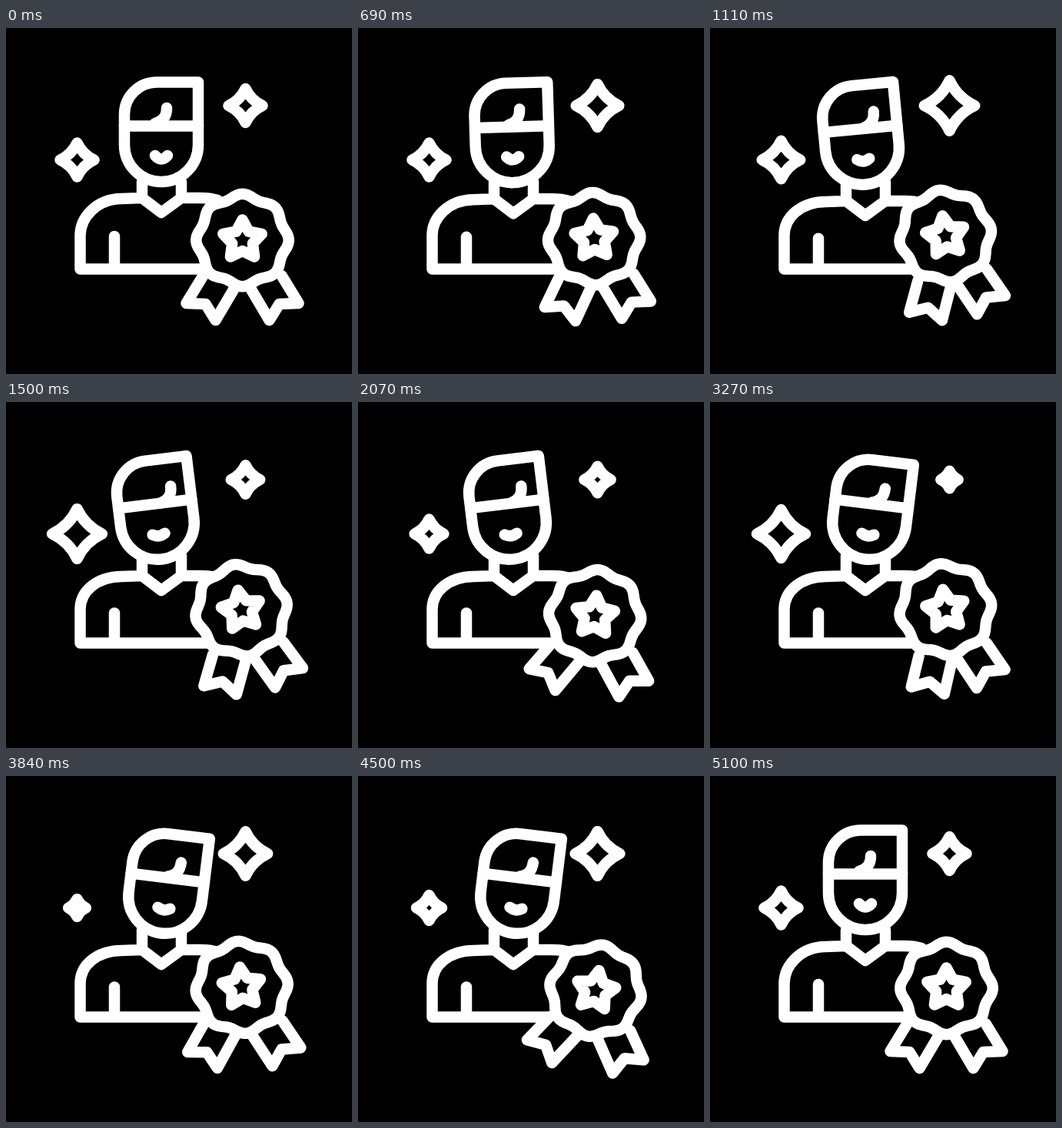
These frames come from a looping animation (450 px wide and 450 px high, 5400 ms). An HTML page:

```html
<!DOCTYPE html>
<html>
<head>
<meta charset="utf-8">
<style>
html, body { margin: 0; height: 100%; overflow: hidden; background: #000; }
svg { display: block; width: 100vw; height: 100vh; }
</style>
</head>
<body>
<svg viewBox="0 0 450 450" fill="none" stroke="#fff" stroke-width="14.5" stroke-linecap="round" stroke-linejoin="round">
  <path id="sparkleL"/>
  <path id="sparkleR"/>
  <path id="body"/>
  <g id="head">
    <path fill="#000" d="M154 112V152a48 48 0 0 0 96 0V70.5H196a42 42 0 0 0-42 41.5Z"/>
    <path d="M154 127.5H250"/>
    <path id="curl" d="M209 104c0 11-5 17-15 20"/>
    <path id="mouth"/>
  </g>
  <g id="award">
    <path id="ribbonL" fill="#000"/>
    <path id="ribbonR" fill="#000"/>
    <g id="badge">
      <path id="rim" fill="#000"/>
      <path id="star"/>
    </g>
  </g>
</svg>
<script>
const LOOP = 5400, STEP = 30, BEGIN = 300, END = 5100;
const set = (id, name, value) => document.getElementById(id).setAttribute(name, value);

// Eased 0 to 1 between two times.
function ramp(t, from, to) {
  const p = Math.min(1, Math.max(0, (t - from) / (to - from)));
  return (1 - Math.cos(Math.PI * p)) / 2;
}

// Leaves rest at `start`, turns every `half` ms between two extremes, settles at END.
function swing(t, start, half, turns, odd, even = -odd) {
  const extreme = i => i === 0 ? 0 : i % 2 ? odd : even;
  const i = Math.min(turns, Math.max(0, Math.floor((t - start) / half)));
  const from = start + i * half;
  const [a, b, to] = i < turns
    ? [extreme(i), extreme(i + 1), from + half]
    : [extreme(i), 0, END];
  return a + (b - a) * ramp(t, from, to);
}

function polar(count, radius) {
  const points = Array.from({ length: count }, (_, i) => {
    const a = i / count * 2 * Math.PI, r = radius(i, a);
    return `${(r * Math.sin(a)).toFixed(2)} ${(-r * Math.cos(a)).toFixed(2)}`;
  });
  return `M${points.join('L')}Z`;
}

function sparkle(x, y, scale) {
  const r = 22 * scale, c = 7 * scale;
  return `M${x} ${y - r}Q${x + c} ${y - c} ${x + r} ${y}Q${x + c} ${y + c} ${x} ${y + r}` +
    `Q${x - c} ${y + c} ${x - r} ${y}Q${x - c} ${y - c} ${x} ${y - r}Z`;
}

const ribbon = side =>
  `M${51 * side} 46L${73 * side} 82L${48 * side} 83L${35 * side} 104L${9 * side} 60`;

function draw(t) {
  const returning = ramp(t, 4500, END);
  const tilt = 7 * (2 * ramp(t, 2000, 3200) - ramp(t, BEGIN, 1480) - returning);
  const curl = 8 * (2 * ramp(t, BEGIN, 1500) - ramp(t, 1800, 2610) - returning);
  const bend = Math.abs(tilt) / 7, top = 221 + 5 * bend;

  set('sparkleL', 'd', sparkle(92.5, 171.5, 1 + swing(t, 860, 760, 4, .5)));
  set('sparkleR', 'd', sparkle(311.5, 101, 1 + swing(t, BEGIN, 752, 5, .5)));

  set('body', 'd', `M262 313.5H96.5V270C96.5 246 118 ${top + 1.5} 150 ${top + 1}L177 ${top}L202 ${top + 19}` +
    `L228 ${top}H252Q266 ${top} 275 ${top + 3}` +
    `M177 200V${top}M228 200V${top}M141 313V${271 + 3.5 * bend}`);
  set('head', 'transform', `translate(0 ${4.5 * bend}) rotate(${tilt} 202 195)`);
  set('curl', 'transform', `translate(${curl} ${curl / 5})`);
  set('mouth', 'd', `M194 ${166 + bend}Q202 ${175 - 3 * bend} 210 ${166 + bend}`);

  const spin = swing(t, 330, 1060, 4, -10);
  const lift = swing(t, BEGIN, 1010, 4, -6, 3.5);
  set('award', 'transform', `translate(${307.5 + .15 * spin} ${276 + lift})`);
  set('badge', 'transform', `rotate(${spin})`);
  set('ribbonL', 'transform', `rotate(${swing(t, BEGIN, 1010, 4, -18, 14)})`);
  set('ribbonR', 'transform', `rotate(${swing(t, 480, 1020, 4, -5, 7)})`);
}

set('ribbonL', 'd', ribbon(-1));
set('ribbonR', 'd', ribbon(1));
set('rim', 'd', polar(180, (i, a) => 57.6 + 2.6 * Math.cos(8 * a)));
set('star', 'd', polar(10, i => i % 2 ? 14 : 26.5));

const start = performance.now();
function frame() {
  const t = (performance.now() - start) % LOOP;
  draw(Math.floor(t / STEP) * STEP);
  requestAnimationFrame(frame);
}
frame();
</script>
</body>
</html>
```
